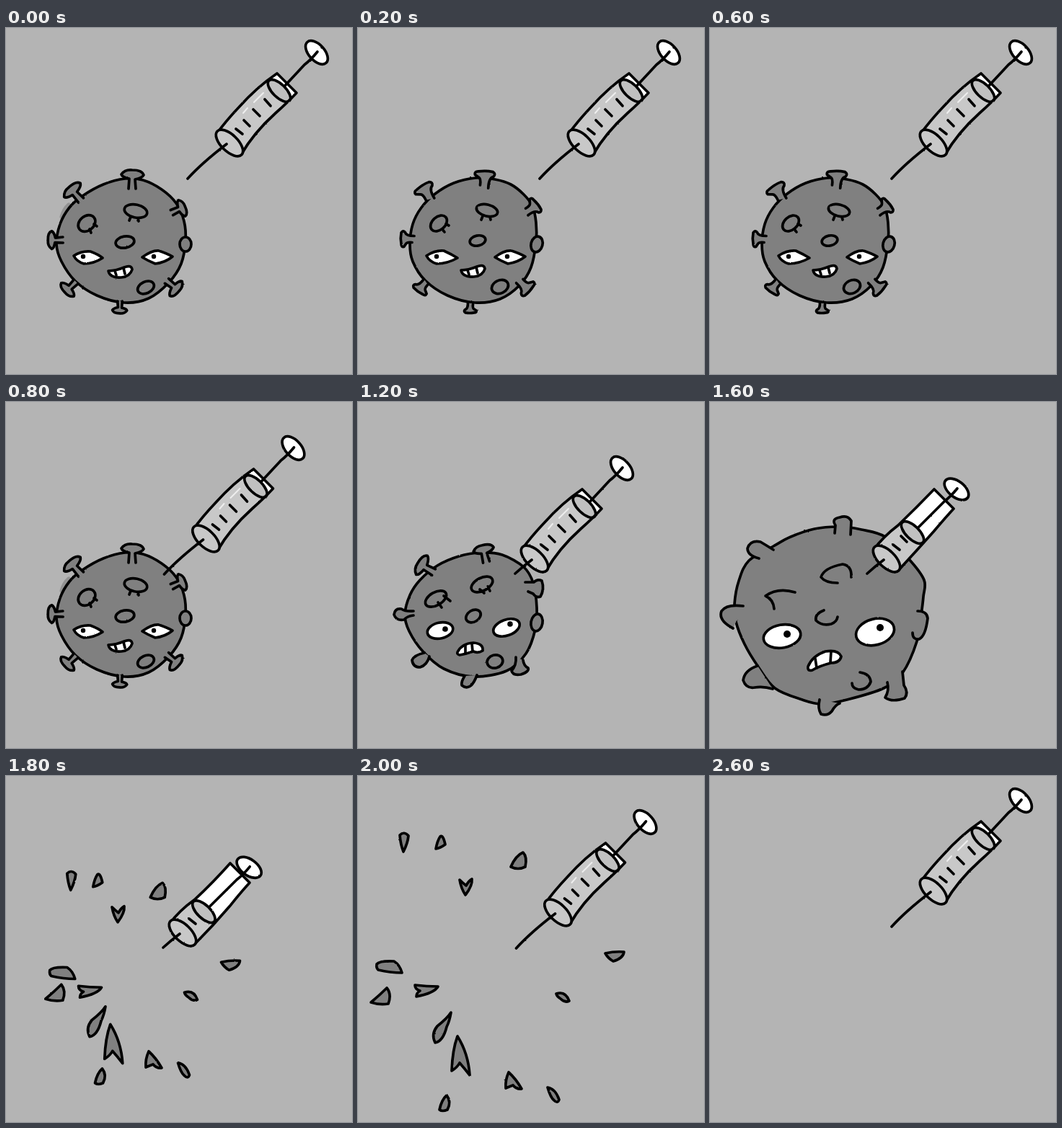
Recreate the animation shown at these times as an HTML page. Size 480x480 px, loop 2800 ms.

```html
<!DOCTYPE html>
<html lang="en">
<head>
<meta charset="utf-8">
<title>Vaccine beats virus</title>
<style>
  html, body { margin: 0; height: 100%; overflow: hidden; background: #b4b4b4; }
  svg { display: block; width: 100vw; height: 100vh; }
  path, ellipse { vector-effect: non-scaling-stroke; }
</style>
</head>
<body>
<svg id="stage" viewBox="0 0 480 480"></svg>
<script>
const GREY = '#808080', STEP = 200, STEPS = 14;

const path = (d, fill = 'none', extra = '') => `<path d="${d}" fill="${fill}" ${extra}/>`;
const oval = (x, y, rx, ry, turn = 0, fill = GREY) =>
  `<ellipse cx="${x}" cy="${y}" rx="${rx}" ry="${ry}" fill="${fill}" transform="rotate(${turn} ${x} ${y})"/>`;
const dot = (x, y, r) => `<circle cx="${x}" cy="${y}" r="${r}" stroke="none"/>`;
const group = (content, transform = '') => `<g transform="${transform}">${content}</g>`;
const shapes = list => list.map(d => path(d, GREY)).join('');

// Closed Catmull-Rom curve through the points
function blob(text) {
  const p = text.split(' ').map(s => s.split(',').map(Number)), n = p.length;
  let d = 'M' + p[0];
  p.forEach((a, i) => {
    const before = p[(i + n - 1) % n], b = p[(i + 1) % n], after = p[(i + 2) % n];
    const c1 = a.map((v, k) => v + (b[k] - before[k]) / 6);
    const c2 = b.map((v, k) => v - (after[k] - a[k]) / 6);
    d += `C${c1} ${c2} ${b}`;
  });
  return path(d + 'Z', GREY);
}

const MUSHROOM = 'M-5 0L-4-14Q-14-16-15-20Q-10-27 0-26Q14-26 16-19Q14-15 4-13L5 0';
const TRUMPET = 'M-6-4Q-5-13-8-15L-14-19Q-15-24-9-24Q2-26 12-24Q17-21 13-17Q6-15 6 0';
const spike = (x, y, turn, size, shape = MUSHROOM) =>
  group(path(shape, GREY), `translate(${x} ${y}) rotate(${turn}) scale(${size})`);
const horn = (x, y, turn, size) => spike(x, y, turn, size, TRUMPET);

const smirk = (dx, dy) => group(
  path('M142 337Q152 337 164 332Q174 328 175 335Q172 345 160 346Q144 347 142 337Z', '#fff') +
  path('M151 337L153 343M163 333L165 341'), `translate(${dx} ${dy})`);

const calm =
  path('M77 262Q80 251 87 245', 'none', 'stroke="#929292" stroke-width="5"') +
  blob('70,300 75,272 88,249 106,233 135,217 165,209 190,211 216,224 236,243 247,268 249,295 243,327 226,353 198,375 164,381 126,371 96,351 77,324') +
  spike(175, 223, 0, 1) + spike(104, 239, -42, .95) + spike(79, 294, -92, .8) +
  spike(97, 352, -135, .82) + spike(158, 379, 180, .65) + spike(223, 351, 128, .85) +
  spike(230, 256, 65, .78) + oval(249, 300, 8, 10) +
  oval(112, 271, 13, 10, -40) + oval(180, 254, 16, 9, 12) + oval(165, 297, 13, 8, -10) + oval(194, 360, 12, 8, -25) +
  path('M116 279L118 284M122 272L126 275M173 262L171 267M183 264L184 268') +
  path('M94 316Q105 309 117 310Q128 314 134 319Q122 327 108 327Q98 324 94 316Z', '#fff') + dot(107, 317, 3.2) +
  path('M189 318Q203 308 212 309Q224 313 231 317Q222 325 207 327Q197 323 189 318Z', '#fff') + dot(205, 317, 3.2) +
  smirk(0, 0);

const calmAlt =
  blob('72,300 76,272 88,249 107,230 133,215 163,208 190,210 212,217 230,231 242,247 247,270 247,297 240,332 224,357 197,376 162,381 124,371 93,350 76,324') +
  horn(175, 222, 2, .95) + horn(101, 239, -32, .95) + horn(78, 293, -90, .75) +
  horn(95, 351, -144, .75) + horn(156, 381, 180, .58) + horn(223, 350, 132, .85) +
  horn(233, 256, 52, .8) + oval(248, 300, 8, 11, 15) +
  oval(112, 271, 13, 9, -42) + oval(179, 253, 15, 8, 14) + oval(166, 295, 11, 7, -12) + oval(197, 359, 12, 9, -25) +
  path('M117 279L120 283M122 272L126 274M173 261L171 266M183 262L184 266') +
  path('M95 316Q107 308 119 309Q130 314 138 319Q124 327 109 327Q99 324 95 316Z', '#fff') + dot(109, 317, 3.2) +
  path('M190 318Q203 308 213 309Q225 313 232 317Q222 325 208 327Q198 323 190 318Z', '#fff') + dot(207, 317, 3.2) +
  smirk(1, -1);

const scared =
  blob('65,295 72,268 86,247 110,227 140,214 170,209 200,212 230,229 243,251 248,285 246,315 233,349 206,373 160,381 119,370 90,346 71,318') +
  spike(178, 222, -14, .92) + spike(105, 236, -61, .98) +
  shapes([
    'M77 290Q66 291 60 287Q51 286 50 295Q53 304 64 302Q68 297 77 296',
    'M92 348Q78 351 75 358Q76 368 86 368Q96 365 99 353',
    'M148 380Q143 388 144 393Q150 398 156 394Q161 390 165 379',
    'M219 354Q220 365 213 373Q215 380 226 378Q238 374 236 369Q230 366 229 358',
    'M232 250L244 250Q249 245 255 248Q259 260 253 270Q247 272 243 266L236 263']) +
  oval(248, 306, 8, 12, 10) + oval(108, 273, 16, 9, -30) + oval(172, 253, 16, 9, -27) +
  oval(160, 297, 11, 8, -32) + oval(190, 360, 11, 9, -15) +
  path('M111 278L116 285M119 269L128 276M169 260L175 265M180 256L183 262') +
  oval(114, 317, 18, 11, -12, '#fff') + dot(121, 315, 3.8) +
  oval(206, 313, 19, 11, -20, '#fff') + dot(211, 308, 3.8) +
  path('M138 347Q144 335 160 334Q174 335 173 345Q166 349 160 346Q148 350 141 351Q137 350 138 347Z', '#fff') +
  path('M149 338L149 349M158 335L159 346');

const bloated =
  blob('34,280 40,248 54,220 88,200 112,187 145,176 180,173 210,177 243,187 276,218 297,247 296,270 293,295 287,332 267,376 241,397 190,413 155,419 128,413 90,397 66,366 48,336 36,305') +
  shapes([
    'M173 182L174 171Q168 162 180 160Q191 156 196 165L195 184',
    'M68 217Q52 213 52 203Q56 191 70 194Q80 200 88 205',
    'M46 283Q23 280 16 290Q11 303 32 314',
    'M66 366Q48 372 46 386Q50 398 62 396Q74 394 87 398',
    'M152 413Q149 425 154 433Q163 436 169 429Q174 420 180 418',
    'M246 389Q249 400 243 410Q252 417 270 411Q276 403 269 393L267 374',
    'M288 290Q301 290 302 300Q299 325 290 329Q281 330 281 320']) +
  path('M89 287Q88 274 77 269Q94 257 118 264M177 251Q160 251 154 243Q158 230 184 225Q197 227 196 243' +
    'M158 289Q145 294 147 303Q155 311 168 308Q176 305 177 298M208 375Q222 377 223 388Q219 399 206 399Q197 397 197 390') +
  oval(100, 325, 26, 16, -10, '#fff') + dot(107, 322, 5) +
  oval(229, 319, 27, 18, -15, '#fff') + dot(236, 313, 5) +
  path('M136 367Q142 352 160 346Q178 343 182 353Q180 362 168 362Q152 366 142 372Q135 374 136 367Z', '#fff') +
  path('M146 356L148 369M168 346L167 361');

const swelling = group(scared, 'matrix(1.19 0 0 1.16 -27.5 -47.7)');

const pieces = [
  'M58 82Q64 76 70 83Q69 93 63 105Q59 95 58 82Z',
  'M114 84Q118 81 121 95Q114 100 108 101Q110 90 114 84Z',
  'M141 144Q146 149 150 152Q154 145 158 143Q159 152 149 165Q143 156 141 144Z',
  'M212 126Q219 110 229 106Q235 112 232 126Q222 131 212 126Z',
  'M26 261Q30 256 50 257Q58 262 61 273Q45 273 28 269Q25 266 26 261Z',
  'M18 314Q30 304 40 294Q47 303 42 316Q30 318 18 314Z',
  'M79 290Q95 292 111 292Q106 301 81 306Q81 301 86 298Q79 296 79 290Z',
  'M129 328Q124 336 110 347Q101 358 107 370Q118 368 123 348Q127 340 129 328Z',
  'M138 361Q131 380 130 409Q138 404 141 398Q148 406 155 415Q153 385 138 361Z',
  'M209 411Q219 420 227 434Q220 435 215 429Q210 431 205 433Q204 422 209 411Z',
  'M263 432Q274 434 279 449Q277 455 272 450Q267 446 263 432Z',
  'M123 443Q130 452 124 463Q117 466 113 463Q116 449 123 443Z',
  'M343 246Q356 243 369 244Q368 253 354 257Q347 253 343 246Z',
  'M275 302Q288 298 293 312Q287 315 281 309Q276 306 275 302Z'];

// Pieces fly away from the burst centre; those past the left edge are gone
function debris(spread, size, shown = pieces) {
  return shown.map(d => {
    const [x, y] = d.match(/\d+/g).map(Number);
    const toX = x + (x - 165) * spread, toY = Math.min(452, y + (y - 295) * spread);
    return toX < 15 ? '' : group(path(d, GREY), `translate(${toX} ${toY}) scale(${size}) translate(${-x} ${-y})`);
  }).join('');
}

// press: 0 is drawn out, 1 is pushed in
function syringe(dx, dy, press = 0, inside = false) {
  const moved = (x, y, byX, byY) => [x + byX * press, y + byY * press];
  const [px, py] = moved(379, 87, -33, 36), [hx, hy] = moved(431, 34, -24, 29);
  const barrel = `M292 147Q305 129 ${moved(323, 110, 3, 3)}Q${moved(348, 82, 4, 6)} 376 63L403 90` +
    `Q391 103 ${moved(374, 118, 1, 4)}Q${moved(343, 146, 7, 4)} 326 176`;
  return group(
    path(barrel, '#c8c8c8', 'stroke="none"') +
    path('M357 90L344 103M335 111L329 118', 'none', 'stroke="#eee" stroke-width="2"') +
    path('M319 140L328 147M330 128L338 136M343 113L352 122M359 99L367 108') +
    path(`M${px - 15} ${py - 14}L376 63L403 90L${px + 15} ${py + 14}Z`, '#fff', 'stroke="none"') +
    oval(px, py, 20, 9, 44, '#c0c0c0') + path(barrel) +
    oval(310, 159.5, 23.5, 11.5, 44, '#c8c8c8') +
    oval(hx, hy, 19.5, 11, 48 - 10 * press, '#fff') +
    path(`M${hx + 1} ${hy - 1}Q${hx - 8} ${hy + 10} ${hx - 17} ${hy + 17}L${px + 8} ${py - 7}`) +
    path(inside ? 'M306 161Q294 170 283 180' : 'M306 161Q272 187 252 209'),
    `translate(${dx} ${dy})`);
}

const home = syringe(0, 0), near = syringe(-32.5, 30);
const inserted = press => syringe(-65, 58, press, true);

const scenes = [
  calm + home, calmAlt + home, calm + home, calmAlt + home,
  calm + near, calm + inserted(0), scared + inserted(0),
  swelling + inserted(.37), bloated + inserted(1),
  debris(-.25, 1) + inserted(1.2), debris(0, 1) + near,
  debris(.25, .75) + home, debris(.3, .55, [pieces[1], pieces[11]]) + home, home];

const stage = document.getElementById('stage');
stage.innerHTML = `
  <filter id="crayon" filterUnits="userSpaceOnUse" x="0" y="0" width="480" height="480" color-interpolation-filters="sRGB">
    <feTurbulence type="fractalNoise" baseFrequency=".2" numOctaves="2" seed="4"/>
    <feDisplacementMap in="SourceGraphic" scale="1.6" xChannelSelector="R" yChannelSelector="G"/>
  </filter>
  <g id="scene" filter="url(#crayon)" stroke="#000" stroke-width="3.7" stroke-linecap="round" stroke-linejoin="round"></g>`;
const scene = document.getElementById('scene');

let current = -1;
function draw() {
  const step = Math.floor(performance.now() / STEP) % STEPS;
  if (step !== current) scene.innerHTML = scenes[current = step];
  requestAnimationFrame(draw);
}
draw();
</script>
</body>
</html>
```
